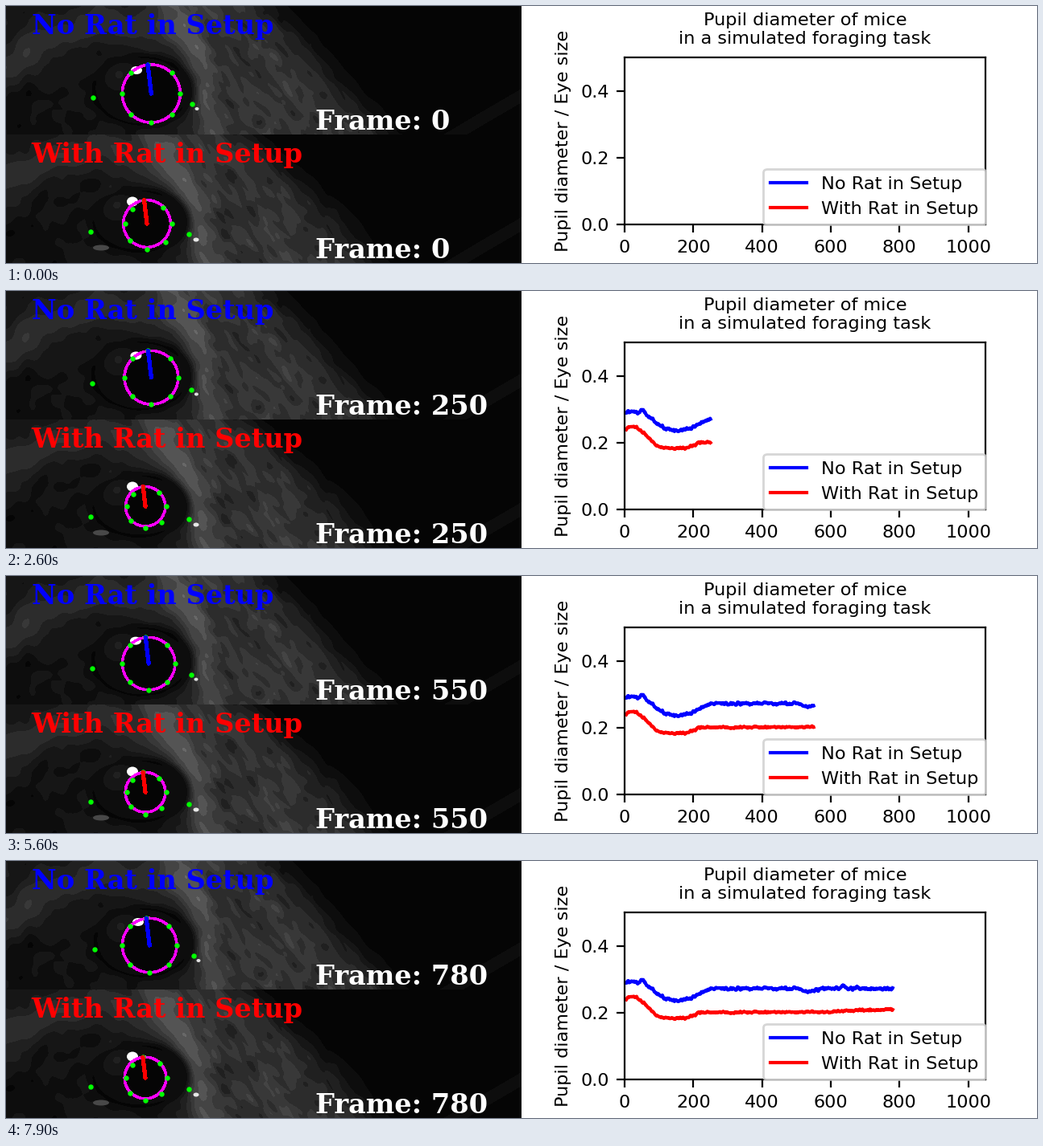
Animation of 1280 by 320 pixels, one loop 8 s. Source, as a matplotlib script:

```python
import numpy as np
import matplotlib.pyplot as plt
from matplotlib.animation import FuncAnimation
from matplotlib.patches import Circle, Ellipse

DPI = 200
W, H, PANEL = 640, 320, 160
PAD = 8
STEPS = 80

plt.rcParams["font.family"] = "DejaVu Sans"
plt.rcParams["font.size"] = 8.06


def px(v):
    return v * 72 / DPI


def soft(v):
    return 1 / (1 + np.exp(-np.clip(v, -40, 40)))


# ---- camera views: flat grey tones from a few soft shapes ----

yy, xx = np.mgrid[-PAD:PANEL + PAD, -PAD:W + PAD].astype(float)
TONES = np.array([5, 13, 22, 32, 44, 56, 68, 84, 104])


def glow(points, width):
    """Soft band along a polyline."""
    pts = np.array(points, float)
    best = np.full(xx.shape, 1e9)
    for (x0, y0), (x1, y1) in zip(pts[:-1], pts[1:]):
        dx, dy = x1 - x0, y1 - y0
        t = np.clip(((xx - x0) * dx + (yy - y0) * dy) / (dx * dx + dy * dy), 0, 1)
        best = np.minimum(best, (xx - x0 - t * dx) ** 2 + (yy - y0 - t * dy) ** 2)
    return np.exp(-best / width ** 2)


def grain(rng, along, across, angle):
    """Seeded noise, smoothed more along one direction than across it."""
    fy = np.fft.fftfreq(xx.shape[0])[:, None]
    fx = np.fft.fftfreq(xx.shape[1])[None, :]
    c, s = np.cos(angle), np.sin(angle)
    u, v = fx * c + fy * s, fy * c - fx * s
    keep = np.exp(-20 * ((u * along) ** 2 + (v * across) ** 2))
    g = np.fft.ifft2(np.fft.fft2(rng.normal(size=xx.shape)) * keep).real
    return g / g.std()


def right_of(points):
    xs, ys = np.array(points, float).T
    return xx - np.interp(yy, ys, xs)


def camera_view(lid, ridge, edge, eye, seed):
    rng = np.random.default_rng(seed)
    fur = soft(right_of(ridge) / 14)
    tone = 21 + 26 * glow(lid, 22) * (1 - fur) + 29 * fur
    tone -= 7 * soft((yy - 95) / 12) * soft((95 - xx) / 16)
    tone += 40 * glow(ridge, 17)
    tone += 3 * grain(rng, 6, 6, 0) + 6 * fur * grain(rng, 7, 2.5, 0.9)
    tone += (5 - tone) * soft(right_of(edge) / 13)
    tone += 7 * glow([(540, 170), (590, 140), (650, 105)], 10)

    cx, cy, rx, ry = eye
    r = np.hypot((xx - cx) / rx, (yy - cy) / ry)
    iris = 13 - 7 * np.exp(-((r - 0.93) / 0.12) ** 2)
    iris += 15 * np.exp(-((xx - cx + 28) ** 2 + (yy - cy + 20) ** 2) / 330)
    tone += (iris - tone) * soft((1 - r) * 18)
    return TONES[np.abs(tone[..., None] - TONES).argmin(-1)]


upper_view = camera_view(lid=[(-10, 85), (45, 40), (120, 18), (235, 40)],
                         ridge=[(198, -10), (238, 60), (256, 170)],
                         edge=[(312, -10), (400, 90), (472, 170)],
                         eye=(168, 105, 66, 47), seed=4)
lower_view = camera_view(lid=[(-10, 62), (50, 30), (120, 15), (215, 50)],
                         ridge=[(175, -10), (226, 70), (250, 170)],
                         edge=[(278, -10), (390, 90), (455, 170)],
                         eye=(165, 107, 64, 42), seed=9)


def shifted(view, dx, dy):
    dx, dy = round(dx), round(dy)
    return view[PAD - dy:PAD - dy + PANEL, PAD - dx:PAD - dx + W]


# ---- measured ratios: a level, soft steps, short bumps and noise ----

time = np.arange(785)


def ratio(level, steps, bumps, noise, seed):
    values = np.full(time.size, level)
    for at, width, height in steps:
        values += height * soft((time - at) / width)
    for at, width, height in bumps:
        values += height * np.exp(-((time - at) / width) ** 2)
    rough = np.random.default_rng(seed).normal(0, noise, time.size)
    return values + np.convolve(rough, np.ones(4) / 2, "same")


without_rat = ratio(.293, [(87, 16, -.058), (211, 14, .037)],
                    [(54, 8, .012), (535, 22, -.010), (637, 8, .008)], .0021, 3)
with_rat = ratio(.237, [(73, 13, -.054), (203, 10, .018), (640, 40, .008)],
                 [(27, 22, .013), (217, 8, .004)], .0014, 8)


# ---- stage ----

fig = plt.figure(figsize=(1280 / DPI, H / DPI), dpi=DPI, facecolor="white")
cam = fig.add_axes([0, 0, 0.5, 1])
cam.set_axis_off()
photo = cam.imshow(np.zeros((H, W)), cmap="gray", vmin=0, vmax=255, aspect="auto",
                   extent=(0, W, H, 0), interpolation="nearest")
cam.set_xlim(0, W)
cam.set_ylim(H, 0)


def write(text, x, y, color):
    return cam.text(x, y, text, color=color, family="DejaVu Serif", weight="bold",
                    fontsize=px(33.7), va="baseline", zorder=6)


class Eye:
    """Tracked pupil with its markers in one camera view."""

    def __init__(self, color, title, top, values, sag, corners, glints):
        self.values = values
        turn = np.radians(np.arange(-45, 270, 45))
        reach = 1 + sag * np.cos(turn - 1)
        self.rim = np.c_[np.cos(turn), np.sin(turn)] * reach[:, None]
        self.corners = np.array(corners)
        self.disc = cam.add_patch(Circle((0, 0), 1, color="#050505", zorder=1))
        self.glints = [(cam.add_patch(Ellipse((x, y), w, h, color=c, lw=0, zorder=2)), x, y)
                       for x, y, w, h, c in glints]
        self.ring = cam.add_patch(Circle((0, 0), 1, fill=False, ec="magenta", lw=px(2.4),
                                         zorder=3, antialiased=False))
        self.dots, = cam.plot([], [], "o", color="lime", ms=px(6.4), mew=0, zorder=4,
                              antialiased=False)
        self.hand, = cam.plot([], [], color=color, lw=px(4.2), zorder=5,
                              solid_capstyle="round", antialiased=False)
        write(title, 31.5, top + 34.5, color)
        self.counter = write("", 383.5, top + 154, "white")

    def update(self, n, x, y, dx=0, dy=0):
        r = 123.5 * self.values[n]
        for circle, radius in ((self.disc, r - 1), (self.ring, r)):
            circle.center = (x, y)
            circle.set_radius(radius)
        for patch, gx, gy in self.glints:
            patch.set_center((gx + dx, gy + dy))
        tip = (x - 0.12 * r, y - r)
        marks = [self.rim * r + [x, y], [tip], self.corners + [dx, dy]]
        self.dots.set_data(*np.vstack(marks).T)
        self.hand.set_data([x, tip[0]], [y, tip[1]])
        self.counter.set_text(f"Frame: {n}")


upper = Eye("blue", "No Rat in Setup", 0, without_rat, 0, [(108, 114), (231, 122)],
            [(162, 80, 14, 10, "white"), (237, 128, 5, 4, "#e0e0e0")])
lower = Eye("red", "With Rat in Setup", PANEL, with_rat, 0.12, [(104.5, 281), (227, 284)],
            [(157, 243.5, 14, 12, "white"), (236, 291, 7, 5, "#e6e6e6"),
             (118, 301, 20, 7, "#484848")])

ax = fig.add_axes([768 / 1280, 48 / H, 448 / 1280, 208 / H])
ax.set_xlim(0, 1050)
ax.set_ylim(0, 0.5)
ax.set_xticks(range(0, 1001, 200))
ax.set_yticks([0, 0.2, 0.4])
ax.set_title("Pupil diameter of mice\nin a simulated foraging task", fontsize="medium")
ax.set_ylabel("Pupil diameter / Eye size")
curves = [(ax.plot([], [], color="blue", lw=1.5, label="No Rat in Setup")[0], without_rat),
          (ax.plot([], [], color="red", lw=1.5, label="With Rat in Setup")[0], with_rat)]
ax.legend(loc="lower right", borderaxespad=0)


def update(k):
    n = 10 * max(0, k - 1)
    dx = np.interp(n, [0, 400, 650, 780], [0, -1, -1, 2])
    dy = np.interp(n, [0, 500, 650, 780], [0, 1, 0, -4])
    photo.set_data(np.vstack([shifted(upper_view, dx, dy), shifted(lower_view, 0, 0)]))
    upper.update(n, 179 + 2 * np.cos(2 * np.pi * (n - 130) / 950),
                 np.interp(n, [0, 170, 380, 670, 780], [109, 107, 109, 109, 105]), dx, dy)
    lower.update(n, 173 + 2 * np.exp(-n / 80),
                 np.interp(n, [0, 170, 780], [271, 268, 270]))
    for curve, values in curves:
        curve.set_data(time[5:n + 1], values[5:n + 1])
    return []


anim = FuncAnimation(fig, update, frames=STEPS, interval=100, repeat=True, repeat_delay=0)
plt.show()
```
